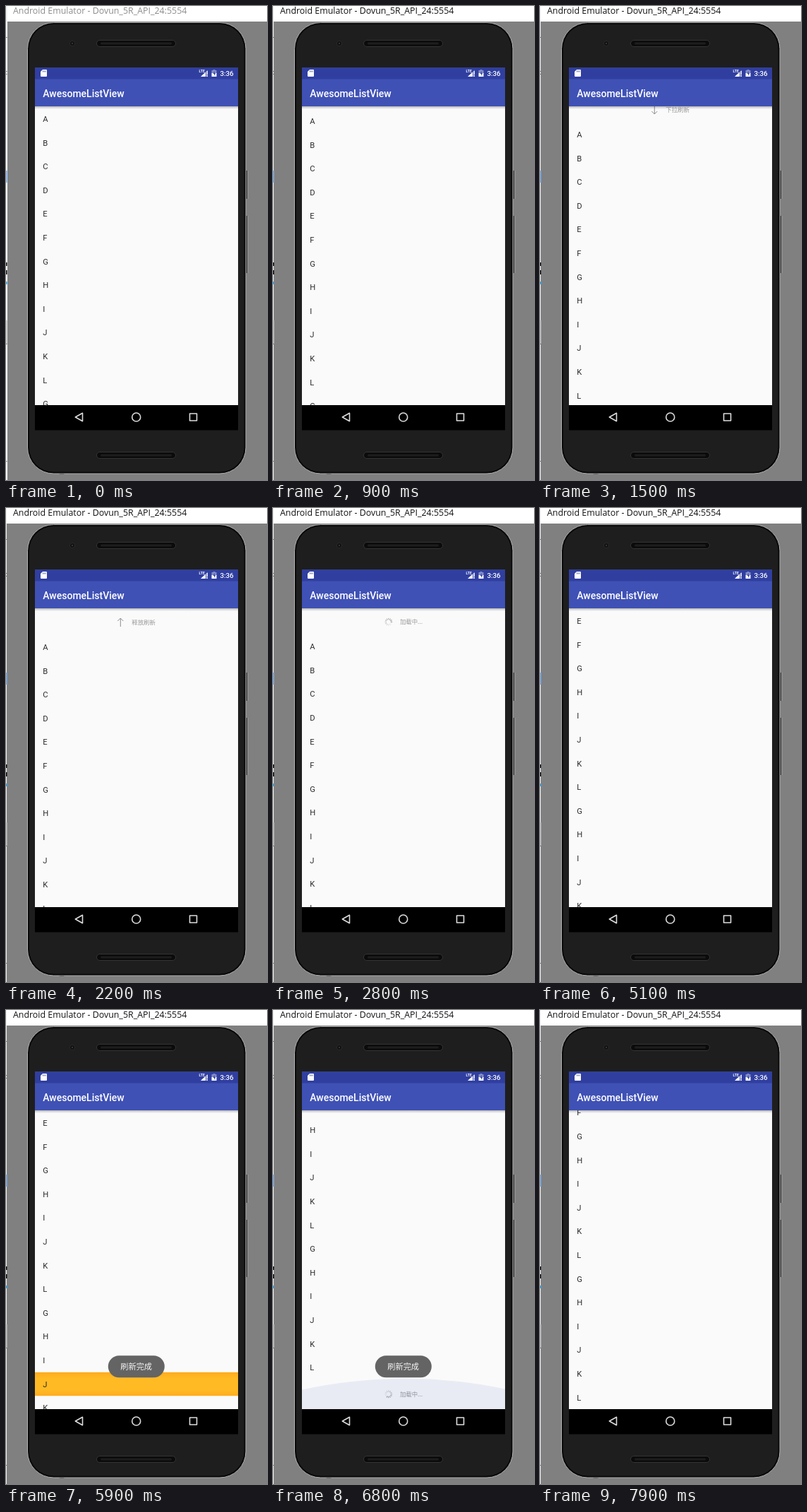
An HTML page for the animation above (8000 ms loop, 370 by 671 pixels).

```html
<!DOCTYPE html>
<html lang="zh-CN">
<head>
<meta charset="utf-8">
<title>AwesomeListView</title>
<style>
html, body { margin: 0; width: 100%; height: 100%; overflow: hidden; background: #808080; }
svg { display: block; }
text { font-family: Roboto, sans-serif; }
.cjk { font-family: "Noto Sans CJK SC", "Noto Sans CJK", sans-serif; }
.hint { font-size: 8.4px; fill: #999; }
.row { font-size: 11.2px; fill: #2a2a2a; }
.arrow { fill: none; stroke: #8c8c8c; stroke-width: 1; }
.nav { fill: none; stroke: #dcdcdc; stroke-width: 1.6; stroke-linejoin: round; }
#caption { font: 12.4px "Open Sans", "Noto Sans", sans-serif; }
</style>
</head>
<body>
<svg width="370" height="671" viewBox="0 0 370 671">
  <defs>
    <linearGradient id="shade" x2="0" y2="1">
      <stop offset="0" stop-opacity=".26"/>
      <stop offset="1" stop-opacity="0"/>
    </linearGradient>
    <linearGradient id="press" x2="0" y2="1">
      <stop offset="0" stop-color="#ffab1c"/>
      <stop offset=".25" stop-color="#ffba24"/>
      <stop offset=".75" stop-color="#ffba24"/>
      <stop offset="1" stop-color="#ffab1c"/>
    </linearGradient>
    <clipPath id="view"><rect x="41" y="142" width="288" height="423"/></clipPath>
    <g id="slot">
      <rect x="128.5" y="-4.5" width="112" height="9" rx="4.5" fill="#0b0b0b" stroke="#343434"/>
      <rect x="134" y="-1.5" width="101" height="3" rx="1.5" fill="#1d1d1d"/>
    </g>
  </defs>

  <!-- desktop and emulator window -->
  <rect width="370" height="671" fill="#808080"/>
  <rect width="370" height="22" fill="#fff"/>
  <rect id="strip" y="0" width="2" height="671" fill="#f4f4f4"/>
  <path d="M0 44.5h1.5M0 92.5h1.5M0 96.5h1.5M0 478.5h1.5M0 644.5h1.5" stroke="#777"/>
  <path d="M0 233h1.5v17H0z" fill="#7fb0ea"/>
  <path d="M0 363h1.5v5H0zM0 374h1.5v6H0z" fill="#111"/>
  <path d="M0 390h1.5v4H0z" fill="#35a5e5"/>
  <path d="M0 445h1.5v33H0z" fill="#c9c9c9"/>
  <text id="caption" x="10" y="11">Android Emulator - Dovun_5R_API_24:5554</text>

  <!-- handset -->
  <path d="M341.5 233v40M341.5 297v81" stroke="#2a2a2a" stroke-width="2"/>
  <path d="M342.8 233v40M342.8 297v81" stroke="#b4b4b4" stroke-width=".8"/>
  <ellipse cx="79" cy="661.5" rx="4" ry="1.5" fill="#222"/>
  <rect x="30.5" y="23.5" width="309.5" height="638.5" rx="37" fill="#0a0a0a" stroke="#b0b0b0"/>
  <rect x="32.5" y="25.5" width="305.5" height="634.5" rx="35" fill="#1e1e1e" stroke="#080808"/>
  <use href="#slot" y="53"/>
  <use href="#slot" y="636"/>
  <circle cx="94" cy="53" r="3.6" fill="#101010" stroke="#2b2b2b"/>
  <circle cx="94" cy="53" r="1.2" fill="#3a3333"/>

  <!-- list -->
  <rect x="41" y="142" width="288" height="423" fill="#fafafa"/>
  <g clip-path="url(#view)">
    <g id="list">
      <rect id="pressed" x="41" y="647.2" width="288" height="33.4" fill="url(#press)"/>
      <g id="rows"></g>
      <g id="header" transform="translate(0 125)">
        <g id="pull">
          <path id="arrow" class="arrow" d="M0-6V6M-4 2L0 6L4 2"/>
          <text id="hint" class="cjk hint" x="178.3" y="3.2"></text>
        </g>
        <g id="busyTop"></g>
      </g>
      <g id="footer" transform="translate(0 768.8)"></g>
    </g>
    <path id="glow" d="M41 537.5Q187 506.5 329 536.5V610H41z" fill="#3f51b5"/>
    <rect x="41" y="142" width="288" height="4" fill="url(#shade)"/>
  </g>

  <!-- bars -->
  <rect x="41" y="87" width="288" height="17" fill="#303f9f"/>
  <rect x="41" y="103.5" width="288" height="38.5" fill="#3f51b5"/>
  <text x="52.2" y="128.6" font-size="14" font-weight="500" fill="#fff">AwesomeListView</text>
  <path d="M52 90h5q1 0 1 1v8q0 1-1 1h-7q-1 0-1-1v-6z" fill="#fff"/>
  <path d="M52.5 91.5v2M54.3 91.5v2M56.1 91.5v2" stroke="#303f9f" stroke-width=".8"/>
  <text x="273.6" y="94.4" font-size="5" font-weight="700" fill="#fff">LTE</text>
  <path d="M276 100L282.800 93.500V100z" fill="#fff"/>
  <path d="M286 90.500V100H283V93.500z" fill="#fff" opacity=".4"/>
  <path d="M285.200 92v5M285.200 98.300v1.700" stroke="#fff" stroke-width="1.200"/>
  <path d="M293.500 90h3v1h2v4.500h-7v-4.500h2z" fill="#fff" opacity=".4"/>
  <path d="M291.500 95h7v5h-7z" fill="#fff"/>
  <path d="M295.600 92l-2 4h1.500v3l2-4h-1.500z" fill="#303f9f"/>
  <text x="303.400" y="99" font-size="9.800" font-weight="500" fill="#fff">3:36</text>
  <rect x="41" y="565" width="288" height="35.500" fill="#000"/>
  <path class="nav" d="M108.500 576.300V587.700L98.300 582z"/>
  <circle class="nav" cx="184.700" cy="582" r="6"/>
  <rect class="nav" x="260.500" y="577" width="10" height="10"/>

  <g id="toast">
    <rect x="144.800" y="489.300" width="80" height="31" rx="15.500" fill="#646464"/>
    <text class="cjk" x="162.300" y="509" font-size="11.200" fill="#f2f2f2">刷新完成</text>
  </g>
</svg>
<script>
const LOOP = 8000, STEP = 100, PITCH = 33.6, THRESHOLD = 35;
const $ = id => document.getElementById(id);

// Each track is a list of [time, value]; equal neighbours hold.
const listY = [
  [800, 0], [900, 3], [1500, 22], [2000, 35.2], [2200, 37], [2700, 37.5], [2900, 35],
  [4999, 35], [5000, 29], [5099, 29], [5100, -134.4],
  [5900, -134.4], [6000, -138], [6300, -178], [6500, -212], [6700, -225],
  [7600, -225], [7900, -182.6]
];
const toastAlpha = [[5100, 0], [5400, 1], [7100, 1], [7500, 0]];
const glowDrop = [[6400, 43], [6700, 2], [6800, 0], [7500, 43]];
const glowAlpha = [[6400, 0], [6700, .09], [6800, .09], [7500, 0]];
const arrowTurn = [[2000, 0], [2200, 180]];

function at(track, t) {
  const i = track.findIndex(k => k[0] > t);
  if (i === 0) return track[0][1];
  if (i < 0) return track[track.length - 1][1];
  const [t0, a] = track[i - 1], [t1, b] = track[i];
  return a + (b - a) * (t - t0) / (t1 - t0);
}

const between = (t, from, to) => t >= from && t < to;
const show = (id, on) => $(id).style.display = on ? "" : "none";

$("rows").innerHTML = [..."ABCDEFGHIJKLGHIJKL"].map((c, i) =>
  `<text class="row" x="52.2" y="${164 + i * PITCH}">${c}</text>`).join("");

const spokes = Array.from({ length: 12 }, (_, i) =>
  `<path d="M0-3V-5.4" stroke="#777" opacity="${.1 + .75 * i / 11}" transform="rotate(${i * 30})"/>`).join("");
const busy = `<g transform="translate(163.800 0)"><g class="spin">${spokes}</g></g>
  <text class="cjk hint" x="180" y="3.2">加载中...</text>`;
$("busyTop").innerHTML = $("footer").innerHTML = busy;
const spinners = document.querySelectorAll(".spin");

function draw(now) {
  const t = Math.floor(now % LOOP / STEP) * STEP;
  const y = at(listY, t);
  const active = t >= 600, loading = t >= 2800;

  $("caption").setAttribute("fill", active ? "#111" : "#8c8c8c");
  $("strip").setAttribute("width", active ? 1 : 2);
  $("list").setAttribute("transform", `translate(0 ${y})`);

  $("hint").textContent = y >= THRESHOLD ? "释放刷新" : "下拉刷新";
  $("arrow").setAttribute("transform", `translate(162.3 0) rotate(${at(arrowTurn, t)})`);
  show("pull", !loading);
  show("busyTop", loading && t < 5100);
  show("footer", between(t, 6000, 7700));
  show("pressed", between(t, 5900, 6000));
  for (const s of spinners) s.setAttribute("transform", `rotate(${t / STEP * 30 % 360})`);

  $("glow").setAttribute("transform", `translate(0 ${at(glowDrop, t)})`);
  $("glow").setAttribute("opacity", at(glowAlpha, t));
  $("toast").setAttribute("opacity", at(toastAlpha, t));
}

function loop() {
  draw(performance.now());
  requestAnimationFrame(loop);
}
loop();
</script>
</body>
</html>
```
